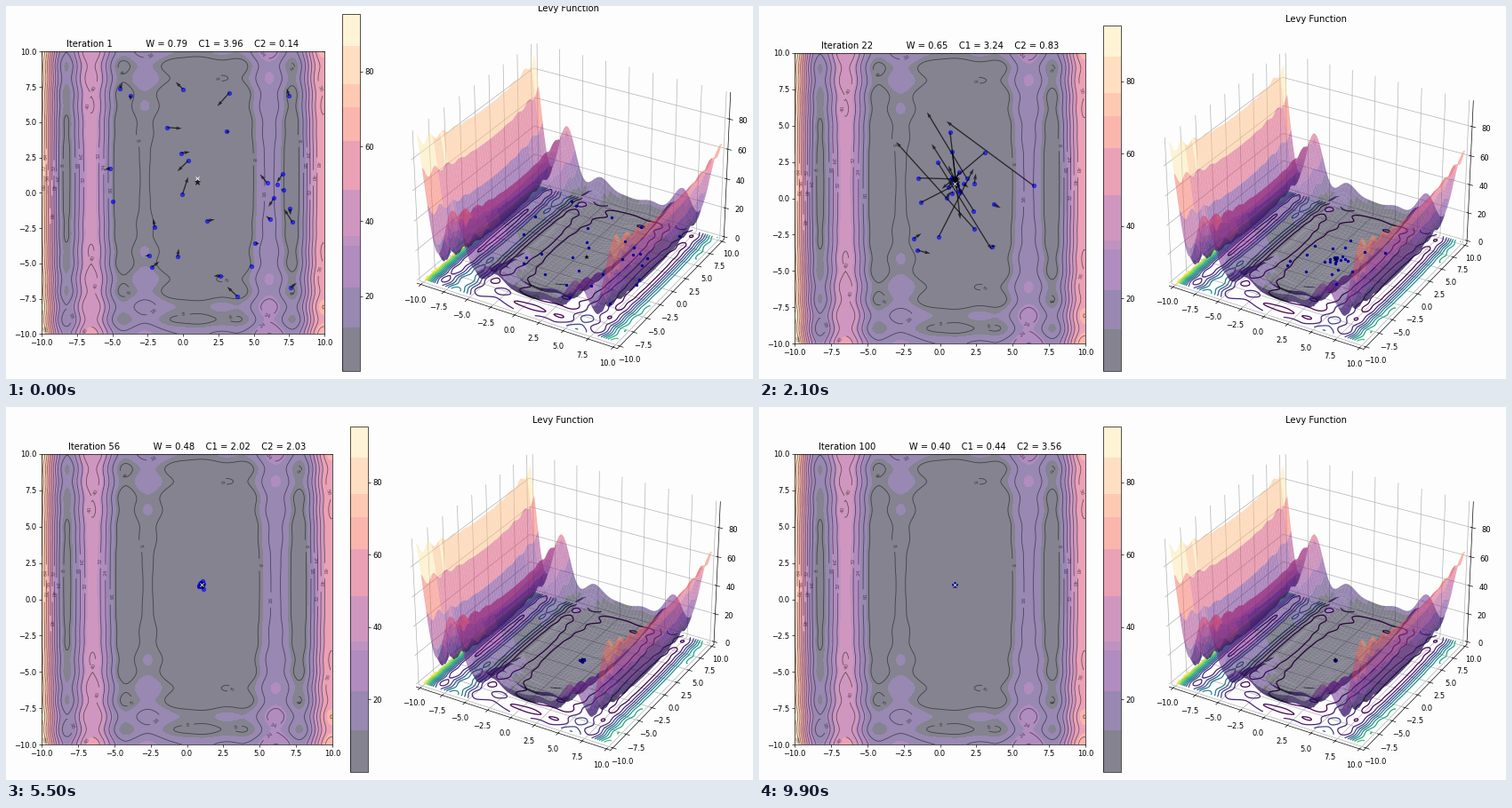
Animation of 840x420 px, one loop 10 s. Source, as a matplotlib script:

```python
import numpy as np
import matplotlib.pyplot as plt
from matplotlib.animation import FuncAnimation
from matplotlib.cm import ScalarMappable
from matplotlib.colors import ListedColormap, Normalize

W, H, DPI = 840, 420, 60
STEPS = 100
COUNT = 30
PAPER = "#fdfdfd"
TICKS = np.arange(-10, 10.1, 2.5)
LEVELS = np.arange(8, 96, 8)

# Height bands, each in the magma colour of its middle
BANDS = np.array([0, 11.3, 22.3, 33.4, 36, 48.6, 61.6, 70.5, 77, 87, 95.4])
TOP = BANDS[-1]
MAGMA = plt.get_cmap("magma")((BANDS[:-1] + BANDS[1:]) / 2 / TOP)[:, :3]
PALE = 0.5 + 0.5 * MAGMA
RAMP = np.digitize(np.linspace(0, TOP, 256), BANDS[1:-1])

# Boxes in pixels from the top left: x, y, width, height
FIRST = dict(map=(40, 51.3, 318, 318), bar=(378, 9, 20, 402),
             cube=(432, 10, 401, 401))
SETTLED = dict(map=(40, 53, 327, 327), bar=(387, 22, 20, 389),
               cube=(432, 22, 389, 389))


def levy(x, y):
    u, v = 1 + (x - 1) / 4, 1 + (y - 1) / 4
    return (np.sin(np.pi * u) ** 2
            + (u - 1) ** 2 * (1 + 10 * np.sin(np.pi * u + 1) ** 2)
            + (v - 1) ** 2 * (1 + np.sin(2 * np.pi * v) ** 2))


def factors(step):
    s = max(step, 1) / STEPS
    return 0.4 * (s - 1) ** 2 + 0.4, 4 - 3.6 * s, 0.1 + 3.5 * s


def run_swarm():
    """Particle swarm search; the speed limit shrinks as the swarm closes in."""
    rng = np.random.default_rng(4)
    pos = rng.uniform(-8, 8, (COUNT, 2))
    vel = rng.normal(0, 0.5, (COUNT, 2))
    own = pos.copy()
    best = np.array([1.0, 0.8])
    track = [(pos, vel, best)]
    for step in range(1, STEPS):
        pos = np.clip(pos + vel, -10, 10)
        better = levy(*pos.T) < levy(*own.T)
        own[better] = pos[better]
        top = own[levy(*own.T).argmin()].copy()
        if levy(*top) < levy(*best):
            best = top
        w, c1, c2 = factors(step)
        r1, r2 = rng.random((2, COUNT, 1))
        vel = w * vel + c1 * r1 * (own - pos) + c2 * r2 * (best - pos)
        limit = 6 * np.exp(-max(0, step - 21) / 14)
        vel = np.clip(vel, -limit, limit)
        track.append((pos, vel, best))
    return track


def place(box):
    x, y, w, h = box
    return [x / W, 1 - (y + h) / H, w / W, h / H]


def add_cube(box):
    ax = fig.add_axes(place(box), projection="3d")
    ax.patch.set_visible(False)
    pad = 25 / 24
    ax.set(xlim=(-10 * pad, 10 * pad), ylim=(-10 * pad, 10 * pad),
           zlim=(TOP / 2 * (1 - pad), TOP / 2 * (1 + pad)))
    return ax


def draw_map(box):
    ax = fig.add_axes(place(box))
    ax.contourf(X, Y, Z, BANDS, colors=PALE)
    lines = ax.contour(X, Y, Z, LEVELS, colors="black", alpha=0.5,
                       linewidths=1)
    ax.clabel(lines, fontsize=7, fmt="%d")
    ax.set(xticks=TICKS, yticks=TICKS)


def draw_bar(box):
    scale = ScalarMappable(Normalize(0, TOP), ListedColormap(PALE[RAMP]))
    fig.colorbar(scale, cax=fig.add_axes(place(box)), ticks=[20, 40, 60, 80])


def draw_cube(box):
    ax = add_cube(box)
    ax.plot_surface(X, Y, Z, cmap=ListedColormap(MAGMA[RAMP]), alpha=0.5)
    ax.contour(X, Y, Z, LEVELS, cmap="viridis", offset=0)
    ax.set_title("Levy Function", y=1.085)
    ax.set(xticks=TICKS, yticks=TICKS, zticks=[0, 20, 40, 60, 80])
    for axis in (ax.xaxis, ax.yaxis, ax.zaxis):
        axis.set_pane_color((1, 1, 1, 0))


def backdrop(layout):
    """Paint the fixed parts once and keep the picture."""
    draw_map(layout["map"])
    draw_bar(layout["bar"])
    draw_cube(layout["cube"])
    fig.canvas.draw()
    image = np.array(fig.canvas.buffer_rgba())
    fig.clf()
    return image


def update(step):
    layout = SETTLED if step else FIRST
    back.set_data(images[1 if step else 0])
    flat.set_position(place(layout["map"]))
    cube.set_position(place(layout["cube"]))

    pos, vel, best = track[step]
    dots.set_offsets(pos)
    arrows.set_offsets(pos)
    arrows.set_UVC(*vel.T)
    star.set_data([best[0]], [best[1]])
    dots3.set_data_3d(*pos.T, levy(*pos.T))
    star3.set_data_3d([best[0]], [best[1]], [levy(*best)])

    w, c1, c2 = factors(step)
    flat.set_title(f"Iteration {step + 1}" + " " * 12
                   + f"W = {w:.2f}    C1 = {c1:.2f}    C2 = {c2:.2f}", y=1)


grid = np.linspace(-10, 10, 200)
X, Y = np.meshgrid(grid, grid)
Z = levy(X, Y)

fig = plt.figure(figsize=(W / DPI, H / DPI), dpi=DPI, facecolor=PAPER)
images = [backdrop(FIRST), backdrop(SETTLED)]
track = run_swarm()

canvas = fig.add_axes([0, 0, 1, 1])
canvas.axis("off")
back = canvas.imshow(images[0], aspect="auto", interpolation="nearest")

flat = fig.add_axes(place(FIRST["map"]))
flat.axis("off")
flat.set(xlim=(-10, 10), ylim=(-10, 10))
start, drift, _ = track[0]
dots = flat.scatter(*start.T, s=28, color="blue", alpha=0.6, zorder=2)
arrows = flat.quiver(*start.T, *drift.T, angles="xy", scale_units="xy",
                     scale=1, width=0.004, color="black", alpha=0.7, zorder=3)
star, = flat.plot([1], [1], "*", color="black", ms=8, alpha=0.7, zorder=4)
flat.plot([1], [1], "x", color="white", ms=5, zorder=5)

cube = add_cube(FIRST["cube"])
cube.axis("off")
dots3, = cube.plot([], [], [], "o", color="#0000a0", ms=4, mew=0)
star3, = cube.plot([], [], [], "*", color="black", ms=7, mew=0)

anim = FuncAnimation(fig, update, frames=STEPS, interval=100, repeat=True,
                     repeat_delay=0)
plt.show()
```
